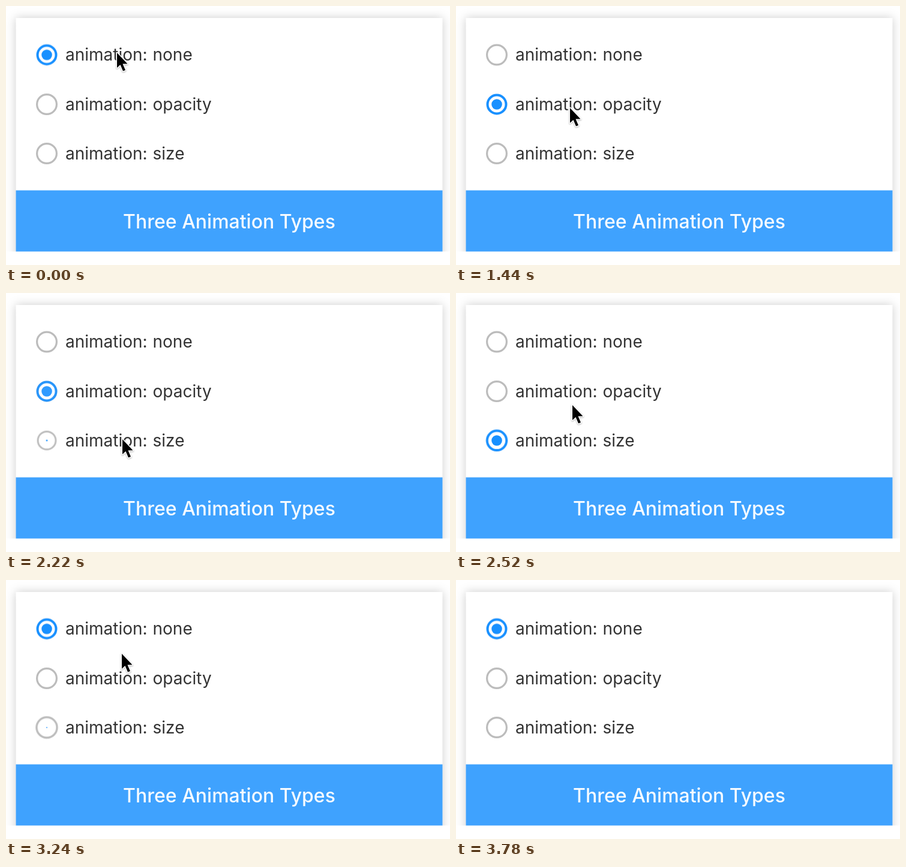
Animation of 740 by 432 pixels, one loop 3960 ms. Source, as an HTML page:

```html
<!DOCTYPE html>
<html lang="en">
<head>
<meta charset="utf-8">
<title>Three Animation Types</title>
<style>
  html, body { margin: 0; width: 100%; height: 100%; overflow: hidden; background: #fff; }
  svg { display: block; width: 740px; height: 432px; font-family: Inter, Roboto, sans-serif; }
  .card { fill: #fff; filter: drop-shadow(0 0 8px rgba(0, 0, 0, .2)); }
  .label { font-size: 28px; fill: #333; word-spacing: 1px; }
  .title { font-size: 32px; font-weight: 450; fill: #f7fbff; text-anchor: middle; }
  .ring { fill: #fff; stroke: #bcbcbc; stroke-width: 3.2px; }
  .on .ring { stroke: #1890ff; stroke-width: 4px; }
  .dot { fill: #1890ff; }
  .pointer path {
    stroke: #fff; stroke-width: 3px; stroke-linejoin: round; paint-order: stroke;
    filter: drop-shadow(0 1px 1px rgba(0, 0, 0, .3));
  }

  .none, .opacity, .size .ring, .size .dot, .pointer { animation: 3960ms infinite; }
  .none { animation-name: none-on; animation-timing-function: step-end; }
  .opacity { animation-name: fade; }
  .size .ring { animation-name: ring; }
  .size .dot { animation-name: dot; }
  .pointer { animation-name: move; }

  /* Every steps(n) runs at one step per 60 ms. */
  @keyframes none-on {
    0%, 100% { opacity: 1; }
    31.818% { opacity: 0; }
    75.757% { opacity: 1; }
  }
  @keyframes fade {
    0%, 30.303% { opacity: 0; animation-timing-function: steps(4); }
    36.363%, 54.545% { opacity: 1; animation-timing-function: steps(1); }
    56.06% { opacity: .9; animation-timing-function: steps(4); }
    62.121%, 100% { opacity: 0; }
  }
  @keyframes ring {
    0%, 54.545% { stroke: #bcbcbc; stroke-width: 3.2px; transform: scale(1); animation-timing-function: steps(1); }
    56.06% { stroke: #bcbcbc; stroke-width: 3.2px; transform: scale(.91); animation-timing-function: steps(5); }
    63.636% { stroke: #1890ff; stroke-width: 4px; transform: scale(.99); animation-timing-function: steps(3); }
    68.181%, 75.757% { stroke: #1890ff; stroke-width: 4px; transform: scale(.95); animation-timing-function: steps(3); }
    80.303%, 81.818% { stroke: #bcbcbc; stroke-width: 3.2px; transform: scale(1.04); animation-timing-function: steps(2); }
    84.848%, 100% { stroke: #bcbcbc; stroke-width: 3.2px; transform: scale(1); }
  }
  @keyframes dot {
    0%, 54.545% { transform: scale(0); animation-timing-function: steps(1); }
    56.06% { transform: scale(.15); animation-timing-function: steps(4); }
    62.121%, 75.757% { transform: scale(1); animation-timing-function: steps(4); }
    81.818% { transform: scale(.1); animation-timing-function: steps(1); }
    83.333%, 100% { transform: scale(0); }
  }
  @keyframes move {
    0%, 15.151% { transform: translate(184px, 75px); animation-timing-function: steps(2); }
    18.181% { transform: translate(187px, 108px); animation-timing-function: steps(1); }
    19.696% { transform: translate(189px, 136px); animation-timing-function: steps(2); }
    22.727% { transform: translate(190px, 158px); animation-timing-function: steps(2); }
    25.757%, 43.939% { transform: translate(189px, 167px); animation-timing-function: steps(4); }
    50% { transform: translate(192px, 232px); animation-timing-function: steps(2); }
    53.03%, 59.09% { transform: translate(193px, 241px); animation-timing-function: steps(1); }
    60.606% { transform: translate(193px, 230px); animation-timing-function: steps(2); }
    63.636% { transform: translate(193px, 184px); animation-timing-function: steps(2); }
    66.666% { transform: translate(193px, 130px); animation-timing-function: steps(3); }
    71.212%, 78.787% { transform: translate(192px, 82px); animation-timing-function: steps(2); }
    81.818% { transform: translate(192px, 120px); animation-timing-function: steps(2); }
    84.848% { transform: translate(194px, 182px); animation-timing-function: steps(6); }
    93.939% { transform: translate(206px, 405px); animation-timing-function: steps(1); }
    95.454%, 100% { transform: translate(208px, 440px); }
  }
</style>
</head>
<body>
<svg viewBox="0 0 740 432">
  <defs>
    <clipPath id="view"><rect width="740" height="409.5"/></clipPath>
    <circle id="off" class="ring" r="16.4"/>
    <g id="picked" class="on">
      <circle r="18.6" fill="#fff"/>
      <circle class="ring" r="15.5"/>
      <circle class="dot" r="8.8"/>
    </g>
  </defs>

  <g clip-path="url(#view)">
    <rect class="card" x="16.5" y="20" width="711" height="440"/>
    <rect x="16.5" y="307.5" width="711" height="103" fill="#3fa2fe"/>
  </g>
  <text class="title" x="372" y="371">Three Animation Types</text>

  <g transform="translate(68 81.5)">
    <use href="#off"/>
    <use class="none" href="#picked"/>
    <text class="label" x="31" y="9.5">animation: none</text>
  </g>
  <g transform="translate(68 164)">
    <use href="#off"/>
    <use class="opacity" href="#picked"/>
    <text class="label" x="31" y="9.5">animation: opacity</text>
  </g>
  <g class="size" transform="translate(68 246)">
    <circle class="ring" r="16.4"/>
    <circle class="dot" r="8.8"/>
    <text class="label" x="31" y="9.5">animation: size</text>
  </g>

  <g class="pointer">
    <path d="M1 3V28L6.5 23L11 33.5L15 32L10.5 21.5H18.5Z"/>
  </g>
</svg>
</body>
</html>
```
